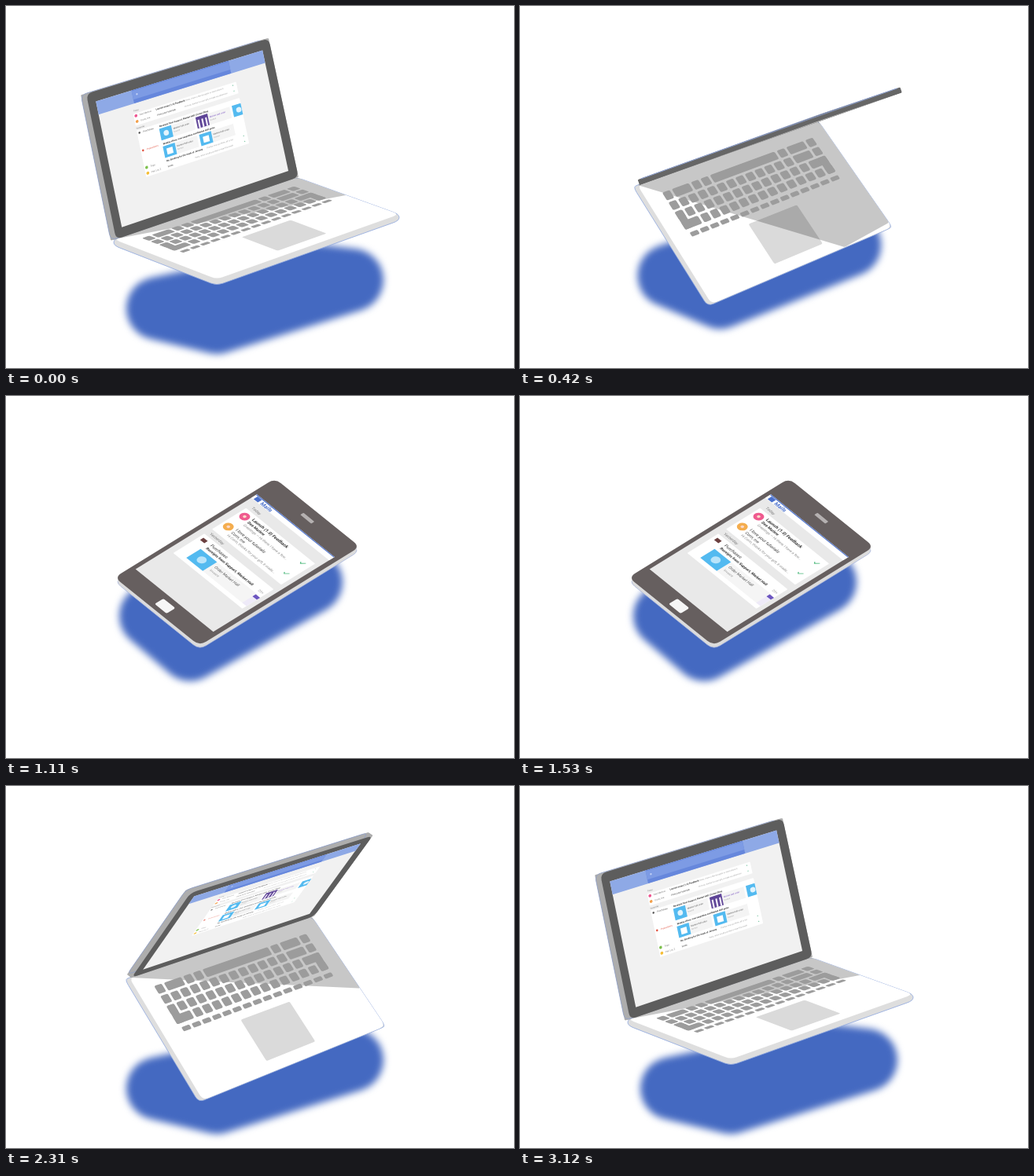
Recreate the animation shown at these times as an HTML page with a canvas. Size 646 by 461 pixels, loop 3150 ms.

```html
<!DOCTYPE html>
<html>
<head>
<meta charset="utf-8">
<style>
html, body { margin: 0; width: 100%; height: 100%; overflow: hidden; background: #fff; }
canvas { display: block; }
</style>
</head>
<body>
<canvas id="stage" width="646" height="461"></canvas>
<script>
const ctx = document.getElementById('stage').getContext('2d');
const LOOP = 3150, TABLET_IN = 515, TABLET_OUT = 2130;
const FONT = 'Roboto, Arial, sans-serif';
const BLUE = '#53baf0';

// device poses: back-left corner, back edge, side edge
const FLAT = [137, 297, 232, -79, 131, 51];
const TILT = [157, 243, 232, -78, 93, 158];
const TABLET = [138, 231, 204, -126, 108, 87];
const LEAN = [136, 252, 213, -120, 115, 71];

// shadow cores, widened by a thick round stroke
const DESK_SHADOW = [193, 385, 268, 403, 440, 349, 390, 343];
const PAD_SHADOW = [184, 280, 234, 323, 388, 237, 345, 197];

// lid angle in degrees
const OPEN = 101.6, CLOSED = -60;

const ramp = (t, a, b) => Math.min(1, Math.max(0, (t - a) / (b - a)));
const ease = (t, a, b) => { const x = ramp(t, a, b); return x * x * (3 - 2 * x); };
const mix = (p, q, k) => p.map((v, i) => v + (q[i] - v) * k);
const add = (p, q) => [p[0] + q[0], p[1] + q[1]];
const quad = (tl, tr, br, bl) => (u, v) => mix(mix(tl, tr, u), mix(bl, br, u), v);
const inset = (m, u0, v0, u1, v1, w, h) =>
  (x, y) => m(u0 + (u1 - u0) * x / w, v0 + (v1 - v0) * y / h);

function poly(pts, color, r = 0, line) {
  const n = pts.length;
  const toward = (p, q) => mix(p, q, Math.min(.5, r / (Math.hypot(q[0] - p[0], q[1] - p[1]) || 1)));
  ctx.beginPath();
  pts.forEach((p, i) => {
    ctx.lineTo(...toward(p, pts[(i + n - 1) % n]));
    ctx.quadraticCurveTo(...p, ...toward(p, pts[(i + 1) % n]));
  });
  ctx.closePath();
  ctx.fillStyle = color;
  ctx.fill();
  if (line) {
    ctx.strokeStyle = line;
    ctx.lineWidth = .8;
    ctx.stroke();
  }
}

function rect(m, x, y, w, h, color, r) {
  poly([m(x, y), m(x + w, y), m(x + w, y + h), m(x, y + h)], color, r);
}

// run a drawing in the plane of a face, with its origin at x, y
function at(m, x, y, draw) {
  const o = m(x, y), p = m(x + 1, y), q = m(x, y + 1);
  ctx.save();
  ctx.transform(p[0] - o[0], p[1] - o[1], q[0] - o[0], q[1] - o[1], ...o);
  draw();
  ctx.restore();
}

function text(m, x, y, str, size, color = '#777', weight = 400) {
  at(m, x, y, () => {
    ctx.font = `${weight} ${size}px ${FONT}`;
    ctx.fillStyle = color;
    ctx.fillText(str, 0, 0);
  });
}

function dot(m, x, y, r, color) {
  at(m, x, y, () => {
    ctx.fillStyle = color;
    ctx.beginPath();
    ctx.arc(0, 0, r, 0, 7);
    ctx.fill();
  });
}

function check(m, x, y) {
  at(m, x, y, () => {
    ctx.strokeStyle = '#4ab87a';
    ctx.lineWidth = 1;
    ctx.beginPath();
    ctx.moveTo(-2.5, 0);
    ctx.lineTo(-.8, 2);
    ctx.lineTo(3, -2.5);
    ctx.stroke();
  });
}

function drawShadow(t) {
  const s = mix(DESK_SHADOW, PAD_SHADOW, ease(t, 240, 660) - ease(t, 1740, 2300));
  ctx.save();
  ctx.filter = 'blur(5px)';
  ctx.fillStyle = ctx.strokeStyle = '#4469c1';
  ctx.lineJoin = 'round';
  ctx.lineWidth = 80;
  ctx.beginPath();
  for (let i = 0; i < 8; i += 2) ctx.lineTo(s[i], s[i + 1]);
  ctx.closePath();
  ctx.fill();
  ctx.stroke();
  ctx.restore();
}

// each digit is the width of one key
function drawKeys(m) {
  const color = '#9c9c9c', left = .09, unit = .845 / 16, gap = .012;
  ['12117121', '111111111111121', '111111111111112', '211111111111111'].forEach((row, r) => {
    let u = left;
    for (const c of row) {
      rect(m, u, .115 + r * .083, c * unit - gap, .066, color, 2);
      u += c * unit;
    }
  });
  for (const u of [left, left + unit * 15])
    rect(m, u, .281, unit - gap, .149, color, 2);
  for (let i = 0; i < 15; i++)
    rect(m, left + .01 + i * .0555, .46, .043, .035, color, 1.5);
}

function drawBase(H, U, A, shade) {
  const slant = (A[1] - 51) * .05;
  const back = add(H, U), front = add(H, A);
  const right = add(add(back, A), [0, -(A[1] - 20) * .12]);
  const low = [-slant, 8 - slant];
  poly([H, back, right, add(right, low), add(front, low), add(H, low)], '#dedede', 8, '#8fa7df');
  poly([H, back, right, front], '#fff', 8);
  const m = quad(H, back, right, front);
  rect(m, .385, .56, .268, .35, '#dadada', 2);
  const edge = shade < 1 ? [mix(back, right, shade)] : [mix(right, back, .04), mix(right, front, shade - 1)];
  poly([H, back, ...edge], 'rgba(0,0,0,.22)', 2);
  drawKeys(m);
}

function drawInbox(m) {
  rect(m, 0, 0, 225, 163, '#f1f1f1');
  rect(m, 0, 0, 225, 17, '#8ea9e6');
  rect(m, 48, 0, 131, 17, '#6687dc');
  rect(m, 48, 1, 131, 11, '#7d9be4');
  dot(m, 54, 6.5, 1.2, '#c3d1f5');
  text(m, 45, 27, 'Today', 2.6);
  rect(m, 44, 29.5, 139, 15.5, '#fff', 1);
  text(m, 44, 49.5, 'Yesterday', 2.6);
  rect(m, 44, 51, 139, 61, '#fff', 1);
  [['#ee5590', 'Dee Marlow', 'Launch notes (1.0) Feedback', 'Hi there, I have a few thoughts to share about it'],
   ['#f2a04c', 'Corin, me', 'I love your tutorials', 'Hi Corin, thanks for your gift, it made my afternoon'],
   ['#7cc04c', 'Trips', 'Re: Booking for the week of January', 'Thanks, see you there, all is set'],
   ['#f5bd35', 'Pat, Lin, 2', 'Invite', 'Hello, when would you like to meet this week']
  ].forEach(([color, name, title, body], i) => {
    const y = 32.8 + i % 2 * 7.4 + (i > 1 ? 67.5 : 0);
    dot(m, 47, y, 1.9, color);
    text(m, 52, y + 1, name, 3);
    text(m, 74, y + 1, title, 3, '#333', i % 2 ? 400 : 700);
    text(m, i === 2 ? 128 : 111, y + 1, body, 2.6, '#999');
    dot(m, 178, y, .6, '#56b58a');
  });
  [['#555', 'Purchases', 'Receipts from Support, Market Hall, Corner Shop'],
   ['#e0503f', 'Promotions', 'Weekly offers, new templates and Market Hall picks']
  ].forEach(([color, name, title], i) => {
    const y = 55 + i * 23;
    dot(m, 47, y, 1.3, color);
    text(m, 52, y + 1, name, 3, color);
    text(m, 74, y + 1, title, 3, '#333', 700);
    for (let k = 0; k < 3 - i; k++) drawOffer(m, 73 + k * 49, y + 3, i ? 3 : k);
  });
}

function drawOffer(m, x, y, kind) {
  const last = kind === 2;
  rect(m, x, y, last ? 12 : 46, 15, '#f4f4f4');
  rect(m, x, y, last ? 12 : 16, 15, kind === 1 ? '#5f4597' : BLUE);
  if (kind === 1) for (let k = 2; k < 16; k += 5) rect(m, x + k, y + 4, 2.2, 11, '#f3eefa');
  else if (kind === 3) rect(m, x + 4, y + 4, 8, 8, '#fff');
  else dot(m, x + 8, y + 7.5, 3.5, '#e2f4fd');
  if (last) return;
  text(m, x + 18, y + 6, 'Market Hall order', 2.8, kind === 1 ? '#7a55c0' : '#555');
  text(m, x + 18, y + 10, 'Invoice', 2.5, '#999');
}

function drawLid(H, U, angle) {
  const a = angle * Math.PI / 180;
  // the lid looks shorter while it points at the viewer
  const length = 190 - 95 * Math.exp(-(((angle - 33) / 32) ** 2));
  const L = [length * Math.cos(a), -length * Math.sin(a)];
  const bl = add(H, [3, 0]), br = add(bl, U), tl = add(bl, L);
  const tr = add(add(br, L), [0, -L[1] * .045]);
  const face = [tl, tr, br, bl];
  const inside = a + Math.atan2(U[1], U[0]) > .1;
  const rim = face.map(p => add(p, [-7 * Math.sin(a), -7 * Math.cos(a)]));
  const side = inside ? '#adadad' : '#666';
  face.forEach((p, i) => {
    const j = (i + 1) % 4;
    poly([p, face[j], rim[j], rim[i]], side, 1);
  });
  poly(rim, side, 8, '#8fa0cc');
  poly(face, inside ? '#5d5d5d' : '#b4b4b4', 8);
  if (inside) drawInbox(inset(quad(...face), .042, .068, .955, .935, 225, 163));
}

function drawMail(m) {
  const dark = '#333', accent = '#4a70cc';
  rect(m, 0, 0, 128, 178, '#e9e9e9');
  rect(m, 0, 0, 128, 8, '#fff');
  rect(m, 0, 0, 128, 1.2, accent);
  rect(m, 3, 1.5, 7, 6, accent);
  text(m, 13, 7.4, 'Mails', 7, accent, 700);
  text(m, 12, 19, 'Today', 5);
  rect(m, 8, 23, 114, 50, '#fff', 1);
  [['#ef5a8f', 'Launch (1.0) Feedback', 'Dee Marlow', 'Greetings — Hi there, I have a few...', 700],
   ['#f4ad4e', 'I love your tutorials', 'Corin, me', 'Hi Corin, thanks for your gift, it made...', 400]
  ].forEach(([color, title, name, body, weight], i) => {
    const y = 31 + i * 24;
    dot(m, 17, y + 2, 6, color);
    dot(m, 17, y + 2, 2, '#fbd8c8');
    text(m, 26, y, title, 5.6, dark, weight);
    text(m, 26, y + 6.5, name, 5, dark, weight);
    text(m, 26, y + 12.5, body, 4.6, '#888');
    check(m, 112, y + 2);
  });
  text(m, 12, 80.5, 'Yesterday', 5);
  rect(m, 8, 84, 114, 46, '#fff', 1);
  rect(m, 12, 89, 7, 5, '#6b4040');
  text(m, 26, 92, 'Purchases', 5.6, dark);
  text(m, 26, 98.5, 'Receipts from Support, Market Hall', 4.8, dark, 700);
  text(m, 112, 98.5, '20+', 4.4, '#999');
  rect(m, 23, 103, 95, 21, '#f5f5f5');
  rect(m, 23, 103, 27, 21, BLUE);
  dot(m, 36.5, 113.5, 5.5, '#b9e4fa');
  text(m, 54, 111, 'Order Market Hall', 5, '#555');
  text(m, 54, 118, 'Invoice', 4.4, '#999');
  rect(m, 115, 104, 7, 5, '#6c55c0');
  rect(m, 115, 109, 7, 15, '#eeeaf8');
}

function drawTablet(H, U, A) {
  const top = add(H, U);
  const face = [top, add(top, A), add(H, A), H];
  poly(face.map(p => add(p, [0, 5])), '#dcdcdc', 10, '#a9b7dd');
  poly(face.map(p => add(p, [0, 2.5])), '#dcdcdc', 10);
  poly(face, '#665f5f', 10);
  const m = quad(...face);
  rect(m, .43, .05, .13, .02, '#b5b1b1', 1);
  rect(m, .425, .92, .14, .055, '#f6f6f6', 2);
  drawMail(inset(m, .04, .134, .955, .89, 128, 178));
}

// one pass: fold up, shrink, lean, grow, unfold, settle
function pose(t) {
  const settle = Math.sin(Math.PI * ramp(t, 2400, 2900));
  const lift = ease(t, 90, 420) * (1 - ease(t, 420, 1000));
  let p = mix(FLAT, TILT, ease(t, 90, 420));
  p = mix(p, TABLET, ease(t, 380, 600));
  p = mix(p, LEAN, ease(t, 1700, 1980));
  p = mix(p, TILT, ease(t, 1980, 2180));
  p = mix(p, FLAT, ease(t, 2290, 2550));
  p[0] -= 6 * lift;
  p[1] += 5 * settle - 14 * lift;
  p[5] -= 6 * settle;
  const shut = t < TABLET_OUT ? ramp(t, 90, 505) ** 3 : (1 - ramp(t, TABLET_OUT, 2520)) ** 2;
  const angle = OPEN + (CLOSED - OPEN) * shut + 1.6 * settle;
  return { H: p.slice(0, 2), U: p.slice(2, 4), A: p.slice(4), angle };
}

function draw(t) {
  const { H, U, A, angle } = pose(t);
  ctx.clearRect(0, 0, 646, 461);
  drawShadow(t);
  if (t >= TABLET_IN && t < TABLET_OUT) {
    drawTablet(H, U, A);
  } else {
    drawBase(H, U, A, Math.min(2, .45 + .8 * Math.exp((20 - angle) / 26)));
    drawLid(H, U, angle);
  }
}

const start = performance.now();
function frame() {
  draw((performance.now() - start) % LOOP);
  requestAnimationFrame(frame);
}
frame();
</script>
</body>
</html>
```
